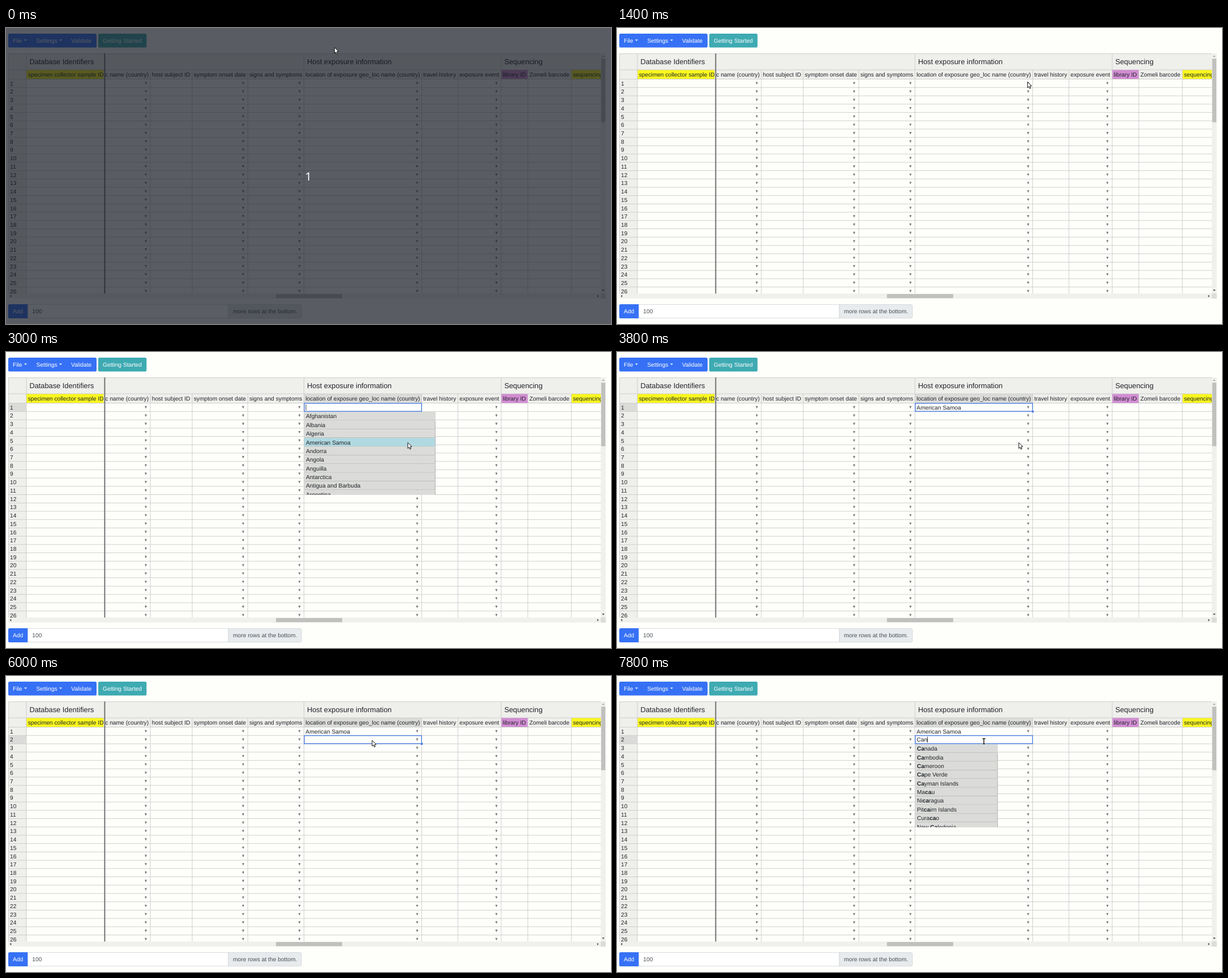
An HTML page with a canvas for the animation above (8000 ms loop, 1069 by 524 pixels).

```html
<!DOCTYPE html>
<html lang="en">
<head>
<meta charset="utf-8">
<title>Spreadsheet entry</title>
<style>
html, body { margin: 0; width: 100%; height: 100%; overflow: hidden; background: #fefefb; }
canvas { display: block; }
</style>
</head>
<body>
<canvas id="stage" width="1069" height="524"></canvas>
<script>
const ctx = document.getElementById('stage').getContext('2d');
const LOOP = 8000, TOP = 90.6, ROW = 14.72, ITEM = 15.37;
const PAPER = '#fefefb', INK = '#212529', BLUE = '#3671f5', SELECT = '#4b7ee0';
const HEAD = '#efefec', ACTIVE = '#dbdcd9', LINE = '#cbcbc9';

const groups = [[36, 'Database Identifiers'], [174.5], [526.5, 'Host exposure information'], [875, 'Sequencing']];
// left edge, label, background, x of the dropdown arrow
const columns = [
  [36, 'specimen collector sample ID', '#faf71f'],
  [172.5, 'c name (country)', HEAD, 247],
  [255, 'host subject ID'],
  [329, 'symptom onset date', HEAD, 419],
  [427.2, 'signs and symptoms', HEAD, 518.5],
  [526.5, 'location of exposure geo_loc name (country)', HEAD, 726.5],
  [734.5, 'travel history'],
  [798.5, 'exposure event', HEAD, 866.5],
  [875, 'library ID', '#d28dd3'],
  [922, 'Zomeli barcode'],
  [999, 'sequencing date', '#faf71f'],
  [1051, '']
];
const allNames = ['Afghanistan', 'Albania', 'Algeria', 'American Samoa', 'Andorra', 'Angola',
  'Anguilla', 'Antarctica', 'Antigua and Barbuda', 'Argentina'];
const cNames = ['Chad', 'Cuba', 'China', 'Canada', 'Cyprus', 'Comoros', 'Croatia', 'Curacao', 'Cambodia', 'Cameroon'];
const caNames = ['Canada', 'Cambodia', 'Cameroon', 'Cape Verde', 'Cayman Islands', 'Macau', 'Nicaragua',
  'Pitcairn Islands', 'Curacao', 'New Caledonia'];

// time, x, y of the pointer
const path = [
  [0, 580, 34], [100, 588.5, 39], [400, 598, 40], [500, 598, 40], [1200, 723, 95], [1300, 723, 95],
  [1400, 725, 95], [1700, 725, 95], [1800, 728, 97.5], [2100, 728, 97.5], [3000, 709.5, 160],
  [4200, 709.5, 160], [4500, 675, 139], [4600, 675, 139], [5100, 645, 117], [5200, 645, 117],
  [5300, 647, 114.5], [5400, 647, 114.5], [5500, 647.5, 113.5], [5900, 647.5, 113.5], [6000, 646.5, 113.5],
  [6800, 646.5, 113.5], [6900, 648.3, 115.5], [LOOP, 648.3, 115.5]
];

function pointerAt(t) {
  const i = path.findIndex(p => p[0] > t);
  const [t0, x0, y0] = path[i - 1], [t1, x1, y1] = path[i];
  const k = (t - t0) / (t1 - t0);
  return [x0 + (x1 - x0) * k, y0 + (y1 - y0) * k];
}

function rect(x, y, w, h, fill) {
  ctx.fillStyle = fill;
  ctx.fillRect(x, y, w, h);
}

function box(x, y, w, h, radii, fill, stroke) {
  ctx.beginPath();
  ctx.roundRect(x, y, w, h, radii);
  ctx.fillStyle = fill;
  ctx.fill();
  if (stroke) {
    ctx.strokeStyle = stroke;
    ctx.lineWidth = 0.8;
    ctx.stroke();
  }
}

function text(str, x, y, color = INK, size = 10.26, weight = '') {
  ctx.font = `${weight} ${size}px "Liberation Sans", Arial, sans-serif`;
  ctx.fillStyle = color;
  ctx.fillText(str, x, y);
  return x + ctx.measureText(str).width;
}

function shape(points, fill, stroke, width) {
  ctx.beginPath();
  points.forEach(([x, y]) => ctx.lineTo(x, y));
  ctx.closePath();
  ctx.fillStyle = fill;
  ctx.fill();
  if (stroke) {
    ctx.strokeStyle = stroke;
    ctx.lineWidth = width;
    ctx.stroke();
  }
}

// triangle around x, y; (dx, dy) points to its tip
function triangle(x, y, dx, dy, half, fill) {
  shape([[x + dx, y + dy], [x - dx + (dy ? half : 0), y - dy + (dx ? half : 0)],
    [x - dx - (dy ? half : 0), y - dy - (dx ? half : 0)]], fill);
}

const vline = (x, y0, y1, color = LINE, w = 0.9) => rect(x - w / 2, y0, w, y1 - y0, color);
const hline = (y, x0, x1, color = LINE, w = 0.9) => rect(x0, y - w / 2, x1 - x0, w, color);
const rowTop = r => TOP + r * ROW;

function drawControls() {
  box(4, 10, 156, 24.5, 2.6, BLUE);
  box(163, 10, 85.3, 24.5, 2.6, '#3eaab2');
  text('File', 12, 25.6, '#fff');
  text('Settings', 53.5, 25.6, '#fff');
  text('Validate', 115, 25.6, '#fff');
  text('Getting Started', 171, 25.6, '#fff');
  triangle(34.5, 21.8, 0, 1.3, 2.6, '#fff');
  triangle(96.5, 21.8, 0, 1.3, 2.6, '#fff');

  box(38, 489.5, 355, 24, 0, '#fff', '#ced4da');
  box(393, 489.5, 129, 24, [0, 2.6, 2.6, 0], '#e8ebed', '#ced4da');
  box(4, 489, 34.3, 25, [2.6, 0, 0, 2.6], BLUE);
  text('Add', 12, 505, '#fff');
  text('100', 46.3, 505, '#495057');
  text('more rows at the bottom.', 401, 505, '#495057');
}

function drawTable(selected) {
  ctx.save();
  ctx.beginPath();
  ctx.rect(4, 45, 1047, 425);
  ctx.clip();
  rect(4, 45, 1047, TOP - 45, HEAD);
  rect(4, TOP, 32, 380, HEAD);

  columns.forEach(([x, label, fill = HEAD], i) => {
    if (i === columns.length - 1) return;
    const active = i === 5 && selected >= 0;
    rect(x, 74, columns[i + 1][0] - x, TOP - 74, active ? ACTIVE : fill);
    text(label, x + 2.7, 86.1);
    if (i !== 1) vline(x, 74, 470);
  });
  if (selected >= 0) rect(4, rowTop(selected), 32, ROW, ACTIVE);

  for (let r = 0; r < 26; r++) {
    const y = rowTop(r);
    hline(y, 4, 1051);
    text(r + 1, 7, y + 11.1);
    columns.forEach(c => c[3] && triangle(c[3], y + 7.4, 0, 2.2, 2, '#777'));
  }
  hline(45.4, 4, 1051);
  hline(74, 4, 1051);
  vline(4.4, 45, 470);
  groups.forEach(([x, label]) => {
    vline(x, 45, 74);
    if (label) text(label, x + 5.4, 64.2, INK, 12.82);
  });
  vline(174.4, 45, 470, '#717171', 2);
  ctx.restore();
}

function drawScrollbars() {
  rect(1051, 45, 8.7, 434, '#f0f0ed');
  rect(4, 470, 1047, 9, '#f0f0ed');
  rect(1051, 470, 8.7, 9, '#dcdcda');
  rect(1051.7, 54.3, 7.3, 112.5, '#c0c0be');
  rect(477, 471, 117, 7.3, '#c0c0be');
  triangle(1055.3, 49.8, 0, -1.2, 2.4, '#a0a0a0');
  triangle(1055.3, 464.5, 0, 1.2, 2.4, '#444');
  triangle(8, 474.6, -1.2, 0, 2.4, '#444');
  triangle(1046, 474.6, 1.2, 0, 2.4, '#444');
}

function drawSelection(row, editing) {
  const y = rowTop(row);
  if (editing) rect(527, y, 207, ROW, '#fff');
  ctx.strokeStyle = SELECT;
  ctx.lineWidth = 1.4;
  ctx.strokeRect(527, y + 0.2, 207.3, ROW - 0.5);
  if (!editing) {
    rect(731.8, y + ROW - 2.6, 5, 5, '#fff');
    rect(732.5, y + ROW - 2, 3.9, 3.9, SELECT);
  }
}

function drawList(names, top, right, query, hoverY) {
  ctx.save();
  ctx.beginPath();
  ctx.rect(527, top, right - 527, 147);
  ctx.clip();
  names.forEach((name, i) => {
    const y = top + i * ITEM;
    const hover = hoverY >= y && hoverY < y + ITEM;
    rect(527, y, right - 527, ITEM, hover ? '#b1d9e1' : ACTIVE);
    hline(y + ITEM - 0.4, 528, right, '#b6b6b4');
    if (i) vline(right - 0.6, y + 1, y + ITEM, '#b0b0ae');
    const at = name.toLowerCase().indexOf(query), end = at + query.length;
    let x = text(name.slice(0, at), 530, y + 11.4);
    x = text(name.slice(at, end), x, y + 11.4, INK, 10.26, 'bold');
    text(name.slice(end), x, y + 11.4);
  });
  ctx.restore();
}

function drawPointer(x, y, beam) {
  ctx.save();
  ctx.translate(x, y);
  if (beam) {
    for (const [color, grow] of [['#fff', 0.7], ['#111', 0]]) {
      for (const [bx, by, w, h] of [[-0.7, -5, 1.4, 10], [-2.7, -5.3, 5.4, 1.3], [-2.7, 4, 5.4, 1.3]])
        rect(bx - grow, by - grow, w + 2 * grow, h + 2 * grow, color);
    }
  } else {
    shape([[0.4, 0.5], [0.4, 10.7], [2.7, 8.6], [4.3, 12.2], [6, 11.5], [4.5, 7.9], [7.6, 7.6]],
      '#fff', '#111', 1);
  }
  ctx.restore();
}

function draw(t) {
  const [x, y] = pointerAt(t);
  const selected = t < 1700 ? -1 : t < 5500 ? 0 : 1;
  const first = t >= 1800 && t < 3800, second = t >= 6900;
  const editing = first || second;

  rect(0, 0, 1069, 524, PAPER);
  drawControls();
  drawTable(selected);
  drawScrollbars();
  if (selected >= 0) drawSelection(selected, editing);
  if (t >= 3500) text('American Samoa', 529.3, 101.7);

  if (first) {
    if (t < 3500) vline(530, 93, 103, INK, 0.9);
    if (t >= 2000) drawList(allNames, 106, 759, '', y);
  }
  if (second) {
    const typed = t < 7300 ? 'C' : t < 7800 ? 'Ca' : 'Can';
    const end = text(typed, 529.6, 116.3);
    vline(end + 0.2, 107.5, 118, INK, 0.9);
    if (t >= 7500) drawList(caNames, 120.8, 673, 'ca');
    else if (t >= 7000) drawList(cNames, 120.8, 759, 'c');
  }

  if (t < 100) {
    rect(0, 0, 1069, 524, 'rgba(20, 25, 33, 0.7)');
    ctx.font = '20px "Noto Sans", sans-serif';
    ctx.fillStyle = '#fff';
    ctx.fillText('1', 528.5, 269.5);
  }
  drawPointer(x, y, second || (first && y < 106));
}

ctx.textRendering = 'geometricPrecision';

function tick() {
  const t = performance.now() % LOOP;
  draw(Math.floor(t / 100) * 100);
  requestAnimationFrame(tick);
}
tick();
</script>
</body>
</html>
```
